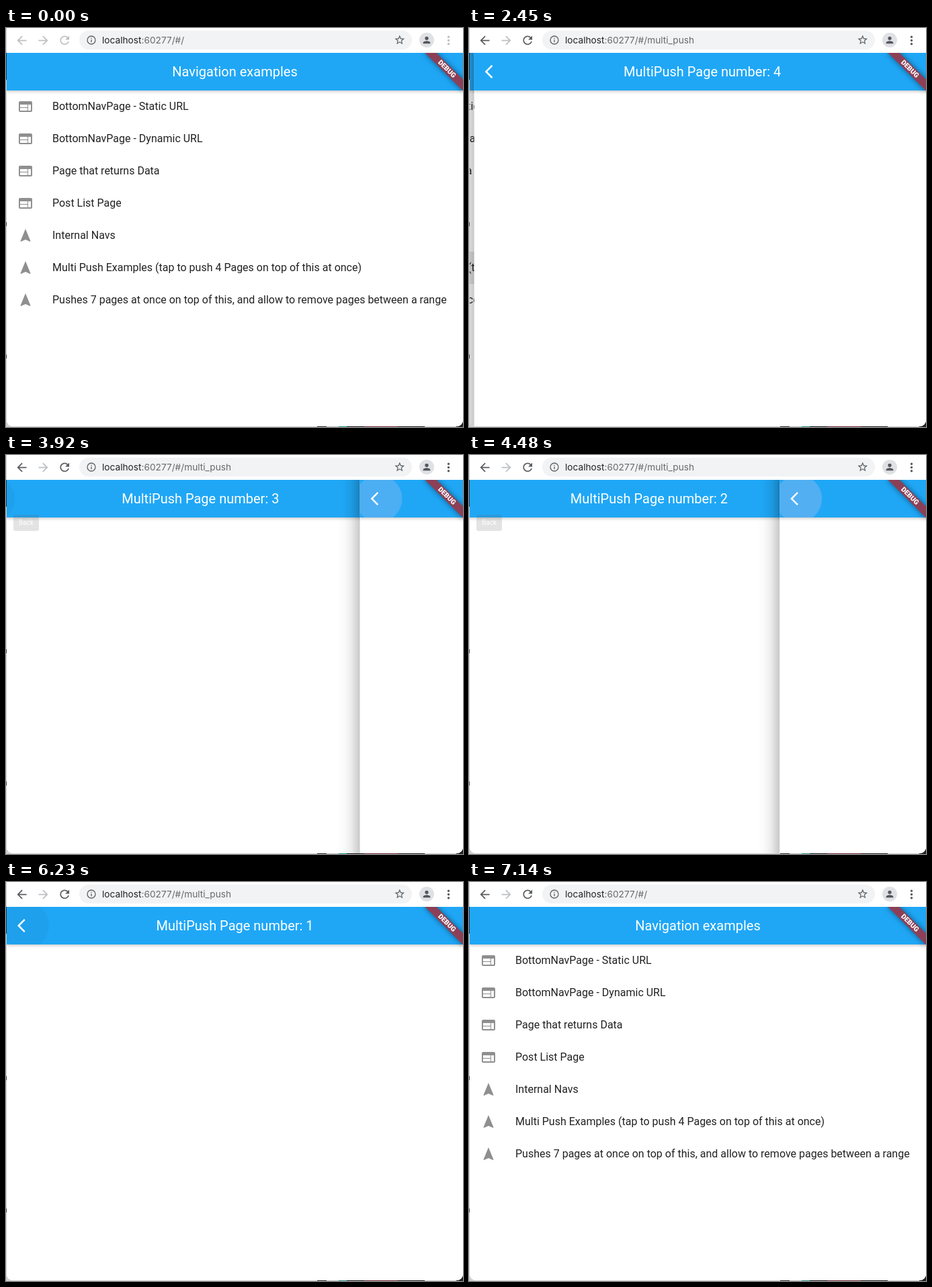
These frames come from a looping animation (680x594 px, 7280 ms). An HTML page:

```html
<!DOCTYPE html>
<html lang="en">
<head>
<meta charset="utf-8">
<title>Navigation examples</title>
<style>
  html, body { margin: 0; width: 100%; height: 100%; overflow: hidden; }
  #stage { position: relative; width: 680px; height: 594px; overflow: hidden; background: #cfcfcf; font-family: Roboto, sans-serif; }
  #stage div, #stage svg { position: absolute; }
  .backdrop { left: 0; top: 37px; width: 1px; height: 40px; background: #1d3553; }
  .mark { left: 0; width: 1px; height: 6px; background: #444; }
  .desk { left: 463px; top: 593px; width: 160px; height: 1px;
    background: linear-gradient(90deg, #222 14px, #bbb 14px 32px, #1d8a80 32px 44px, #111 44px 70px, #6b2430 70px 120px, #151515 120px); }
  .corner { left: 670px; top: 584px; width: 10px; height: 10px; background: #222; }
  #toolbar { left: 1px; top: 0; width: 679px; height: 37px; background: #fff; }
  .pill { left: 108px; top: 4px; width: 495px; height: 28px; border-radius: 14px; background: #f1f3f4; }
  .url { left: 142px; top: 0; line-height: 36px; font: 13.7px/36px Inter, sans-serif; color: #666a6e; white-space: pre; }
  .url b { font-weight: 400; color: #202124; }
  .avatar { left: 614px; top: 7px; width: 22px; height: 22px; border-radius: 50%; background: #dfe1e5; }
  #view { left: 1px; top: 37px; width: 679px; height: 556px; overflow: hidden; border-radius: 0 0 9px 9px; background: #fff; }
  .page { left: 0; top: 0; width: 679px; height: 556px; background: #fff; }
  .bar { left: 0; top: 0; width: 679px; height: 56px; overflow: hidden; background: #1fa7f6; box-shadow: 0 2px 4px rgba(0,0,0,.2); }
  .title { left: 0; width: 100%; text-align: center; font-size: 20px; line-height: 56px; color: #fff; }
  .hover, .splash { left: -7px; top: -7px; width: 70px; height: 70px; border-radius: 50%; opacity: 0; }
  .hover { background: #000; }
  .splash { background: #b2beeb; }
  .edge { left: -34px; top: 0; width: 34px; height: 556px;
    background: linear-gradient(90deg, transparent, rgba(0,0,0,.016) 30%, rgba(0,0,0,.07) 60%, rgba(0,0,0,.22)); }
  .row { left: 0; width: 679px; height: 48px; }
  .row span { position: absolute; left: 68px; font-size: 16px; line-height: 48px; color: rgba(0,0,0,.87); white-space: pre; }
  #tip { left: 10px; top: 52px; width: 38px; height: 24px; border-radius: 3px; background: #616161; color: #fff; font-size: 10px; line-height: 24px; text-align: center; }
  #ribbon { left: 639px; top: 28px; width: 80px; height: 12px; transform-origin: 40px -28px; transform: rotate(45deg);
    background: #8c4057; box-shadow: 0 0 8px rgba(0,0,0,.5); color: #fff; font-size: 10.2px; font-weight: 900; line-height: 12px; text-align: center; }
</style>
</head>
<body>
<div id="stage">
  <div class="backdrop"></div>
  <div class="mark" style="top:289px"></div>
  <div class="mark" style="top:486px"></div>
  <div class="corner"></div>
  <div class="desk"></div>
  <div id="toolbar">
    <div class="pill"></div>
    <div class="url"><b>localhost</b>:60277/#/<span id="route"></span></div>
    <div class="avatar"></div>
  </div>
  <div id="view"></div>
</div>
<script>
const ICONS = {
  back: 'M20 11H7.83l5.59-5.59L12 4l-8 8 8 8 1.41-1.41L7.83 13H20z',
  forward: 'M4 13h12.17l-5.59 5.59L12 20l8-8-8-8-1.41 1.41L16.17 11H4z',
  reload: 'M17.65 6.35A7.96 7.96 0 0 0 12 4c-4.42 0-7.99 3.58-7.99 8s3.57 8 7.99 8c3.73 0 6.84-2.55 7.73-6h-2.08A5.99 5.99 0 0 1 12 18c-3.31 0-6-2.69-6-6s2.69-6 6-6c1.66 0 3.14.69 4.22 1.78L13 11h7V4z',
  info: 'M11 7h2v2h-2zm0 4h2v6h-2zm1-9a10 10 0 1 0 0 20 10 10 0 0 0 0-20zm0 18a8 8 0 1 1 0-16 8 8 0 0 1 0 16z',
  star: 'M22 9.24l-7.19-.62L12 2 9.19 8.63 2 9.24l5.46 4.73L5.82 21 12 17.27 18.18 21l-1.63-7.03zM12 15.4l-3.76 2.27 1-4.28-3.32-2.88 4.38-.38L12 6.1l1.71 4.04 4.38.38-3.32 2.88 1 4.28z',
  person: 'M12 12a4 4 0 1 0 0-8 4 4 0 0 0 0 8zm0 2c-2.67 0-8 1.34-8 4v2h16v-2c0-2.66-5.33-4-8-4z',
  dots: 'M12 8a2 2 0 1 0 0-4 2 2 0 0 0 0 4zm0 6a2 2 0 1 0 0-4 2 2 0 0 0 0 4zm0 6a2 2 0 1 0 0-4 2 2 0 0 0 0 4z',
  web: 'M20 4H4c-1.1 0-2 .9-2 2v12c0 1.1.9 2 2 2h16c1.1 0 2-.9 2-2V6c0-1.1-.9-2-2-2zm-5 14H4v-4h11zm0-5H4V9h11zm5 5h-4V9h4z',
  nav: 'M12 2L4.5 20.29l.71.71L12 18l6.79 3 .71-.71z',
  chevron: 'M11.67 3.87L9.9 2.1 0 12l9.9 9.9 1.77-1.77L3.54 12z'
};
const ROWS = [
  ['web', 'BottomNavPage - Static URL'],
  ['web', 'BottomNavPage - Dynamic URL'],
  ['web', 'Page that returns Data'],
  ['web', 'Post List Page'],
  ['nav', 'Internal Navs'],
  ['nav', 'Multi Push Examples (tap to push 4 Pages on top of this at once)'],
  ['nav', 'Pushes 7 pages at once on top of this, and allow to remove pages between a range']
];
const LOOP = 7280, STEP = 70, WIDTH = 679, SLIDE = 400;
const FOCUS = 910, PUSH = 2118, HOVER = 3500;
const POPS = { 4: 3786, 3: 4369, 2: 5025, 1: 6300 };
const TIP = [[3500, 0], [3650, .9], [3792, .9], [3950, 0], [4190, 0], [4300, .9], [4352, .9], [4510, 0],
  [4640, 0], [4760, .9], [5100, .9], [5245, 0], [5380, 0], [5530, .9], [6090, .9], [6165, 0]];
const ACTIVE = '#5a5d61', INACTIVE = '#bdc0c3';

const $ = id => document.getElementById(id);
const clamp = v => Math.min(1, Math.max(0, v));
const ramp = (t, start, length) => clamp((t - start) / length);

function add(parent, className, text = '') {
  const el = document.createElement('div');
  el.className = className;
  el.textContent = text;
  return parent.appendChild(el);
}

function icon(parent, name, cx, cy, size, color) {
  const ns = 'http://www.w3.org/2000/svg';
  const svg = document.createElementNS(ns, 'svg'), path = document.createElementNS(ns, 'path');
  svg.setAttribute('viewBox', '0 0 24 24');
  svg.style.cssText = `left:${cx - size / 2}px;top:${cy - size / 2}px;width:${size}px;height:${size}px`;
  path.setAttribute('d', ICONS[name]);
  path.style.fill = color;
  svg.append(path);
  parent.append(svg);
  return path;
}

// Cubic bezier (.35, .91, .33, .97)
function ease(p) {
  if (p <= 0 || p >= 1) return clamp(p);
  const bezier = (s, a, b) => 3 * (1 - s) ** 2 * s * a + 3 * (1 - s) * s * s * b + s ** 3;
  let low = 0, high = 1;
  for (let i = 0; i < 24; i++) {
    const mid = (low + high) / 2;
    if (bezier(mid, .35, .33) < p) low = mid; else high = mid;
  }
  return bezier(low, .91, .97);
}

function track(table, t) {
  const i = table.findIndex(([time]) => time > t);
  if (i === 0) return table[0][1];
  if (i < 0) return table[table.length - 1][1];
  const [t0, v0] = table[i - 1], [t1, v1] = table[i];
  return v0 + (v1 - v0) * (t - t0) / (t1 - t0);
}

const toolbar = $('toolbar'), view = $('view');
const backIcon = icon(toolbar, 'back', 22, 18, 21, INACTIVE);
icon(toolbar, 'forward', 54, 18, 21, INACTIVE);
const focusIcons = [icon(toolbar, 'reload', 86, 18, 20.5, INACTIVE), icon(toolbar, 'dots', 657, 18, 21, INACTIVE)];
icon(toolbar, 'info', 126, 18, 16, '#5f6368');
icon(toolbar, 'star', 585, 18, 17.5, '#5a5d61');
icon(toolbar, 'person', 625, 18, 16, '#54585d');

function makePage(title) {
  const el = add(view, 'page');
  const edge = add(el, 'edge');
  const bar = add(el, 'bar');
  const hover = add(bar, 'hover'), splash = add(bar, 'splash');
  add(bar, 'title', title);
  return { el, edge, bar, hover, splash };
}

const home = makePage('Navigation examples');
const rows = ROWS.map(([name, label], i) => {
  const row = add(home.el, 'row');
  row.style.top = 56 + 48 * i + 'px';
  icon(row, name, 28, 24, 24, '#8f8f8f');
  const text = document.createElement('span');
  text.textContent = label;
  row.append(text);
  return row;
});
const pages = [home];
for (let n = 1; n <= 4; n++) {
  pages[n] = makePage('MultiPush Page number: ' + n);
  icon(pages[n].bar, 'chevron', 28, 28, 24, '#fff');
}
home.el.append(home.bar);
const tip = add(view, '', 'Back');
tip.id = 'tip';
add(view, '', 'DEBUG').id = 'ribbon';

// How far page n covers the one below, from 0 to 1
function coverage(n, t) {
  if (n > 4) return 0;
  if (n < 4 && t < PUSH + SLIDE) return 0;
  return ease(ramp(t, PUSH, SLIDE)) * (1 - ease(ramp(t, POPS[n], SLIDE)));
}

function render(t) {
  const pushing = t < PUSH + SLIDE;
  pages.forEach((page, n) => {
    const own = n ? coverage(n, t) : 1;
    const above = coverage(n === 0 && pushing ? 4 : n + 1, t);
    page.el.style.visibility = own > 0 && above < 1 ? 'visible' : 'hidden';
    page.el.style.transform = `translateX(${WIDTH * (1 - own) - WIDTH / 3 * above}px)`;
    if (!n) return;
    const pop = POPS[n];
    page.edge.style.opacity = own < 1 ? ease(Math.min(ramp(t, PUSH, SLIDE), 1 - ramp(t, pop, SLIDE))) : 0;
    page.hover.style.opacity = t < pop ? .04 * ramp(t, HOVER, STEP) : 0;
    page.splash.style.opacity = .5 * ramp(t, pop - 70, 70) * (1 - ramp(t, pop, 350));
  });
  const pressed = .04 * ramp(t, 1820, 70) + .06 * ramp(t, 1980, 130);
  rows[5].style.background = pushing ? `rgba(0,0,0,${pressed})` : 'none';
  tip.style.opacity = track(TIP, t);
  $('route').textContent = t >= PUSH && t < POPS[1] ? 'multi_push' : '';
  backIcon.style.fill = t >= PUSH ? ACTIVE : INACTIVE;
  focusIcons.forEach(path => path.style.fill = t >= FOCUS ? ACTIVE : INACTIVE);
}

const start = performance.now();
function tick() {
  const t = (performance.now() - start) % LOOP;
  render(Math.floor(t / STEP) * STEP);
  requestAnimationFrame(tick);
}
tick();
</script>
</body>
</html>
```
